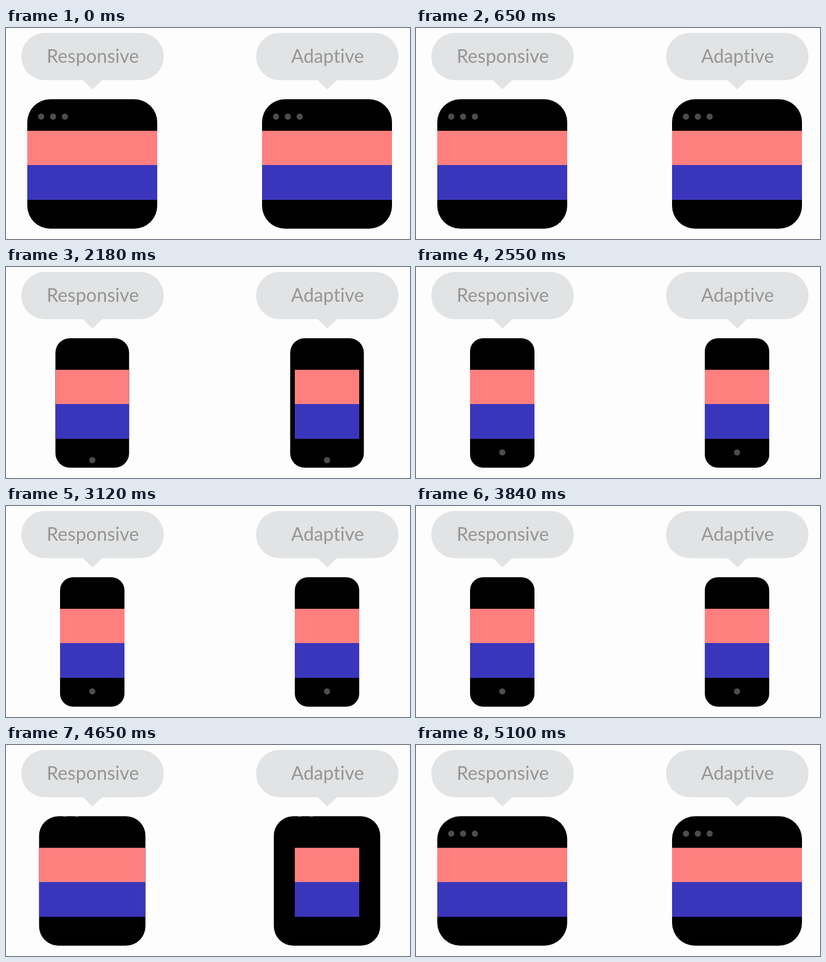
Recreate the animation shown at these times as an HTML page with a canvas. Size 740 by 388 pixels, loop 5140 ms.

```html
<!DOCTYPE html>
<html lang="en">
<head>
<meta charset="utf-8">
<title>Responsive and adaptive</title>
<style>
  html, body { margin: 0; height: 100%; overflow: hidden; background: #fdfdfd; }
  canvas { display: block; }
</style>
</head>
<body>
<canvas id="stage" width="740" height="388"></canvas>
<script>
const ctx = document.getElementById('stage').getContext('2d');
const LOOP = 5140, MOVE = 1040, SHRINK_AT = 1520, GROW_AT = 4090;
const NARROW = 118, WIDE = 238, TOP = 131, BOTTOM = 369;
const SLIDE = 100; // vertical travel of the dots

const lerp = (a, b, k) => a + (b - a) * k;
const ease = x => x < 0.5 ? 8 * x ** 4 : 1 - 8 * (1 - x) ** 4;
const progress = (t, start) => ease(Math.min(1, Math.max(0, (t - start) / MOVE)));

function roundRect(x, y, w, h, r) {
  ctx.beginPath();
  ctx.roundRect(x, y, w, h, r);
}

function dot(x, y) {
  ctx.fillStyle = '#4d4d4d';
  ctx.beginPath();
  ctx.arc(x, y, 5.7, 0, Math.PI * 2);
  ctx.fill();
}

function bubble(cx, label) {
  ctx.fillStyle = '#e2e3e4';
  roundRect(cx - 130, 9, 261, 87, 43.5);
  ctx.fill();
  ctx.beginPath();
  ctx.moveTo(cx - 18, 95);
  ctx.lineTo(cx + 19, 95);
  ctx.lineTo(cx + 0.5, 113);
  ctx.fill();
  ctx.fillStyle = '#959595';
  ctx.font = '34px Lato, sans-serif';
  ctx.letterSpacing = '0.1px'; // also turns ligatures off
  ctx.textAlign = 'center';
  ctx.fillText(label, cx + 1, 64);
}

// size: 0 is the phone, 1 is the browser window
function device(cx, size, contentWidth) {
  const width = lerp(NARROW, WIDE, size), left = cx - width / 2;
  ctx.save();
  roundRect(left, TOP, width, BOTTOM - TOP, lerp(24, 42, size));
  ctx.fillStyle = '#000';
  ctx.fill();
  ctx.clip();
  ctx.fillStyle = '#ff7f7f';
  ctx.fillRect(cx - contentWidth / 2, 189, contentWidth, 63);
  ctx.fillStyle = '#3a36bc';
  ctx.fillRect(cx - contentWidth / 2, 252, contentWidth, 64);
  for (let i = 0; i < 3; i++) dot(left + 25.5 + i * 21.7, 163 - SLIDE * (1 - size));
  dot(cx, 341 + SLIDE * size);
  ctx.restore();
}

function draw(now) {
  const t = now % LOOP;
  const size = 1 - progress(t, SHRINK_AT) + progress(t, GROW_AT);
  const width = lerp(NARROW, WIDE, size);
  ctx.fillStyle = '#fdfdfd';
  ctx.fillRect(0, 0, 740, 388);
  bubble(158, 'Responsive');
  bubble(588, 'Adaptive');
  device(158, size, width);
  device(588, size, size > 0.98 ? WIDE : NARROW);
}

const start = performance.now();
function frame() {
  draw(performance.now() - start);
  requestAnimationFrame(frame);
}
frame();
</script>
</body>
</html>
```
